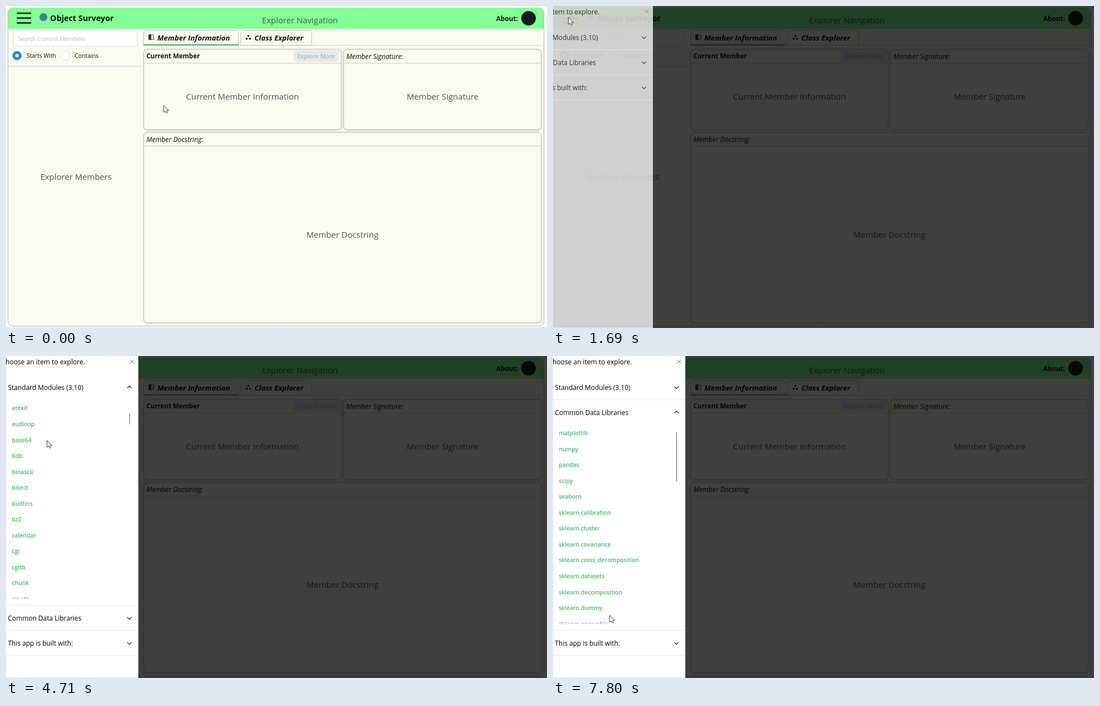
Animation, 969 px wide and 578 px high, one loop 8000 ms. Source, as an HTML page with a canvas:

```html
<!DOCTYPE html>
<html lang="en">
<head>
<meta charset="utf-8">
<title>Module browser</title>
<style>
  html, body { margin: 0; width: 100%; height: 100%; overflow: hidden; background: #fff; }
  canvas { display: block; width: 969px; height: 578px; }
</style>
</head>
<body>
<canvas id="stage" width="969" height="578"></canvas>
<script>
const ctx = document.getElementById('stage').getContext('2d');
const W = 969, H = 578, LOOP = 8000;
const CREAM = '#fbfaee', INK = '#111', GREY = '#555', EDGE = '#bfc1b8', LINE = '#e6e9ec';
const DRAWER = 237, PANEL = 369, ROW = 45, STEP = 28.55;

const MODULES = ('abc aifc argparse array ast asyncio atexit audioop base64 bdb binascii bisect ' +
  'builtins bz2 calendar cgi cgitb chunk cmath cmd code codecs codeop collections colorsys ' +
  'compileall concurrent.futures configparser contextlib contextvars copy copyreg cProfile csv ' +
  'ctypes dataclasses datetime dbm decimal difflib dis distutils doctest email encodings ' +
  'ensurepip enum errno faulthandler fcntl filecmp fileinput fnmatch fractions ftplib ' +
  'functools gc getopt getpass gettext glob graphlib grp gzip').split(' ');
const LIBRARIES = ['matplotlib', 'numpy', 'pandas', 'scipy', 'seaborn'].concat(
  ('calibration cluster covariance cross_decomposition datasets decomposition dummy ensemble')
    .split(' ').map(name => 'sklearn.' + name));

// Where the pointer goes: menu button, first row, list, further down, second row
const VISITS = [
  { from: 0, to: 600, x: 27, y: 20 },
  { from: 2230, to: 2570, x: 64, y: 61 },
  { from: 3690, to: 4300, x: 73, y: 151 },
  { from: 5450, to: 5850, x: 93, y: 206 },
  { from: 6700, to: 7350, x: 101, y: 465 },
];
const WHEEL = [
  { from: 4325, to: 5180, by: 400 },
  { from: 5450, to: 6250, by: 600 },
  { from: 6320, to: 7080, by: 323 },
];

const clamp = v => Math.max(0, Math.min(1, v));
const between = (t, a, b) => t >= a && t < b;
const smooth = p => p * p * (3 - 2 * p);
const glide = (t, { from, to }) => smooth(clamp((t - from) / (to - from)));

// Progress from 0 to 1 in n equal jumps, the first at a and the last at b
function jumps(t, a, b, n) {
  return clamp(Math.floor((t - a) / ((b - a) / (n - 1)) + 1.001) / n);
}

function pointerAt(t) {
  return VISITS.reduce((at, visit) => {
    const p = glide(t, visit);
    return { x: at.x + (visit.x - at.x) * p, y: at.y + (visit.y - at.y) * p };
  }, { x: 282, y: 178 });
}

const scrollAt = t => WHEEL.reduce((sum, turn) => sum + turn.by * glide(t, turn), 0);

function hoveredAt(t) {
  if (between(t, 560, 1080)) return 'menu';
  if (between(t, 2440, 3740)) return 'modules';
  if (between(t, 7210, 7700)) return 'libraries';
  return '';
}

// y is the middle of the capital letters
function text(str, x, y, size, color = INK, style = '', align = 'left') {
  ctx.font = `${style} ${size}px "Open Sans", "Noto Sans", sans-serif`;
  ctx.textAlign = align;
  ctx.fillStyle = color;
  ctx.fillText(str, x, y + size * 0.357);
}

const caption = (str, x, y) => text(str, x, y, 14.85, GREY, '', 'center');

function paint(fill, stroke) {
  ctx.lineWidth = 1;
  if (fill) { ctx.fillStyle = fill; ctx.fill(); }
  if (stroke) { ctx.strokeStyle = stroke; ctx.stroke(); }
}

function box(x, y, w, h, r, fill, stroke) {
  ctx.beginPath();
  ctx.roundRect(x, y, w, h, r);
  paint(fill, stroke);
}

function disc(x, y, r, fill, stroke) {
  ctx.beginPath();
  ctx.arc(x, y, r, 0, Math.PI * 2);
  paint(fill, stroke);
}

function path(points, color, width = 1) {
  ctx.beginPath();
  points.forEach(([x, y]) => ctx.lineTo(x, y));
  ctx.strokeStyle = color;
  ctx.lineWidth = width;
  ctx.stroke();
}

const hline = (x1, x2, y, color, width) => path([[x1, y], [x2, y]], color, width);

function card(x, y, w, h, title, size, style) {
  ctx.save();
  ctx.shadowColor = 'rgba(0,0,0,.14)';
  ctx.shadowBlur = 3;
  ctx.shadowOffsetY = 1;
  box(x, y, w, h, 7, CREAM, EDGE);
  ctx.restore();
  hline(x, x + w, y + 25, '#c9cac1');
  text(title, x + 5, y + 12.7, size, INK, style);
}

function tab(x, w, title) {
  box(x, 43.5, w, 27, [6, 6, 0, 0], CREAM, EDGE);
  text(title, x + 24.5, 57, 13.2, INK, 'italic bold');
}

function radio(x, label, checked) {
  disc(x, 89, 7.8, checked ? '#228be6' : '#fff', checked ? '#228be6' : '#d8dcdf');
  if (checked) disc(x, 89, 3, '#fff');
  text(label, x + 17, 89.5, 10.4);
}

function drawHeader() {
  box(4, 3, 959, 38, [7, 7, 0, 0], '#82ff95');
  for (let i = 0; i < 3; i++) hline(19.5, 45, 13 + i * 8.7, '#0a0f0a', 2.4);
  disc(67, 20, 7, '#3c79ab');
  text('Object Surveyor', 79, 21.5, 14.3, INK, 'bold');
  text('Explorer Navigation', 526.5, 26, 14.85, '#48614c', '', 'center');
  text('About:', 878, 22.5, 11.7, INK, 'bold');
  disc(936, 22, 13, '#161b18');
}

function drawSidebar() {
  box(12.5, 44.5, 222, 28, 3, '#fff', '#dcdfe0');
  text('Search Current Members', 21, 59.5, 10.4, '#b3b9bf');
  radio(19.7, 'Starts With', true);
  radio(106, 'Contains', false);
  hline(4, 243, 108.3, '#d3dadf', 1.3);
  caption('Explorer Members', 125.5, 307);
}

function drawTabs() {
  hline(247, 961, 70.7, '#ced2cf');
  tab(246.5, 170, 'Member Information');
  tab(420.5, 127, 'Class Explorer');
  hline(246, 417, 69.7, '#37b24d', 1.8);
  box(255.5, 51.5, 9, 9, 1, '#ddd', '#444');
  box(256, 51, 4, 10, 0, '#333');
  for (let i = 0; i < 3; i++) {
    const angle = Math.PI * (2 * i / 3 - 0.5);
    disc(434 + 3.4 * Math.cos(angle), 57 + 3.4 * Math.sin(angle), 1.7, INK);
  }
}

function drawPage() {
  box(0, 0, W, H, 0, '#fefefe');
  box(3.5, 3.5, 960, 571, 8, CREAM, '#b5bbb0');
  drawHeader();
  drawSidebar();
  drawTabs();

  card(246.5, 77.5, 354, 144.5, 'Current Member', 11.5, 'bold');
  box(515, 79.5, 81, 20.5, 4, '#e5e9ea');
  text('Explore More', 555.5, 90.3, 10.6, '#b0b7be', '600', 'center');
  caption('Current Member Information', 423.5, 163);

  card(604.5, 77.5, 354.5, 144.5, 'Member Signature:', 12.2, 'italic');
  caption('Member Signature', 782, 163);

  card(246.5, 226.5, 712.5, 342, 'Member Docstring:', 12.2, 'italic');
  caption('Member Docstring', 602.5, 411);
  hline(0, W, 577.5, '#d8d8d8');
}

function chevron(y, turn) {
  ctx.save();
  ctx.translate(221, y - 0.3 - turn);
  ctx.rotate(Math.PI * turn);
  path([[-3.7, -1.8], [0, 1.9], [3.7, -1.8]], INK, 1.2);
  ctx.restore();
}

function drawRow(label, y, open, hovered) {
  if (hovered) box(0, y - 23, DRAWER, 44, 0, '#f8f9fa');
  text(label, 3.5, y, 11.9, '#000', '500');
  chevron(y, open);
}

function drawList(names, top, open, scroll, thumb) {
  if (open <= 0) return;
  ctx.save();
  ctx.globalAlpha *= open;
  ctx.beginPath();
  ctx.rect(0, top + 4, DRAWER, Math.max(0, Math.min(353, PANEL * open - 4)));
  ctx.clip();
  names.forEach((name, i) => {
    text(name, 10.5, top + 15.4 + i * STEP - scroll, 10.3, '#40c057', '600');
  });
  box(220.7, top + 14 + scroll * 0.065, 1.4, thumb, 0, '#75897b');
  ctx.restore();
}

function drawDrawer(t, shown) {
  const second = smooth(jumps(t, 7540, 7800, 5));
  const first = smooth(jumps(t, 2910, 3220, 6)) * (1 - second);
  const hovered = hoveredAt(t);
  const y2 = 102 + PANEL * first;
  const y3 = y2 + ROW + PANEL * second;

  ctx.save();
  ctx.translate(Math.round(DRAWER * (shown - 1)), 0);
  ctx.globalAlpha = shown;
  box(-40, 0, DRAWER + 40, H, 0, '#fff');
  text('Choose an item to explore.', 141.5, 11, 12, '#000', '', 'right');
  for (const s of [-3.5, 3.5]) path([[225.8 - s, 6.5], [225.8 + s, 13.5]], '#777');

  drawRow('Standard Modules (3.10)', 57, first, hovered === 'modules');
  drawList(MODULES, 78, first, scrollAt(t), 19.5);
  drawRow('Common Data Libraries', y2, second, hovered === 'libraries');
  drawList(LIBRARIES, y2 + 21, second, 0, 88);
  drawRow('This app is built with:', y3, 0, false);
  for (const y of [y2 - 23.5, y3 - 23.5, y3 + 21.5, 577.5]) hline(0, DRAWER, y, LINE);
  ctx.restore();
}

function drawHand() {
  box(-4, 6, 11, 10, 4, '#fff', '#444');
  box(-1.5, 0, 3, 10, 1.5, '#fff', '#444');
  box(-1, 7, 7, 6, 2, '#fff');
}

function drawArrow() {
  ctx.beginPath();
  [[0, 0], [0, 12.5], [2.9, 10], [4.8, 14], [6.9, 13.1], [5.1, 9.2], [9, 9.2]]
    .forEach(([x, y]) => ctx.lineTo(x, y));
  ctx.closePath();
  paint('#fff', '#444');
}

function drawPointer(t) {
  const { x, y } = pointerAt(t);
  ctx.save();
  ctx.translate(Math.round(x) + 0.5, Math.round(y) + 0.5);
  if (hoveredAt(t)) drawHand(); else drawArrow();
  ctx.restore();
}

function draw(t) {
  drawPage();
  const opening = clamp(Math.floor((t - 1550) / 70 + 0.001) / 5);
  if (opening > 0) {
    box(0, 0, W, H, 0, `rgba(0,0,0,${0.75 * clamp(opening * 2.5)})`);
    drawDrawer(t, 1 - (1 - opening) ** 2.75);
  }
  drawPointer(t);
}

const start = performance.now();
function frame() {
  draw((performance.now() - start) % LOOP);
  requestAnimationFrame(frame);
}
frame();
</script>
</body>
</html>
```
